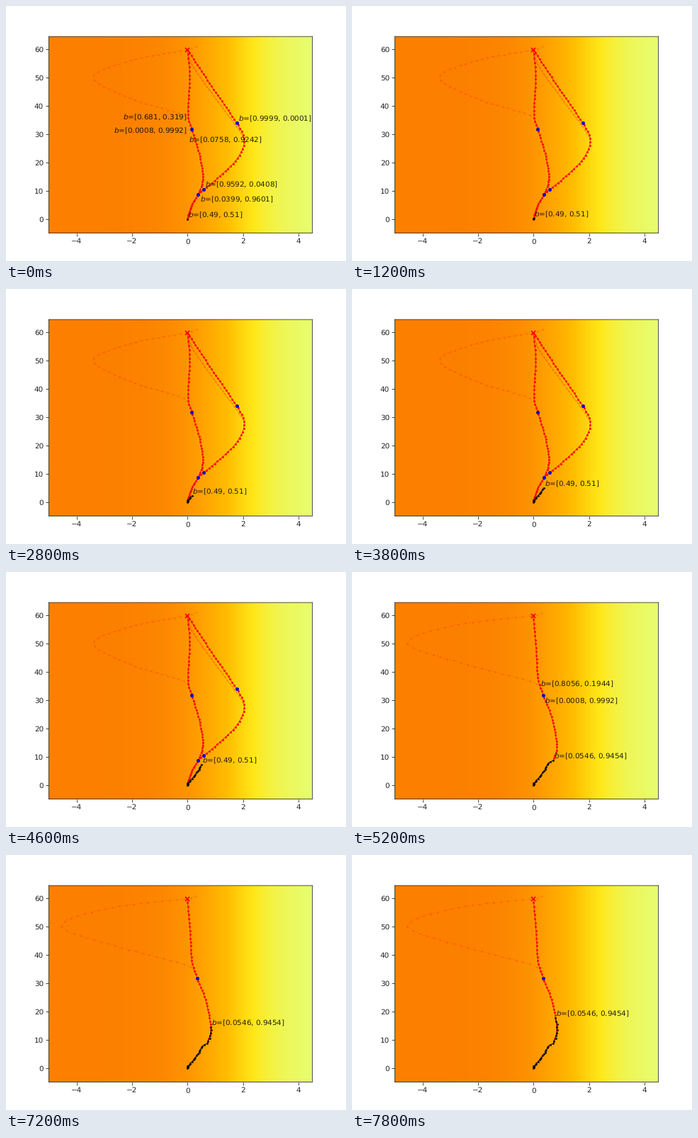
Write a matplotlib script that moves like this. It is 480 by 360 pixels and loops after 8000 ms.

```python
import numpy as np
import matplotlib.pyplot as plt
from matplotlib.animation import FuncAnimation

W, H, DPI = 480, 360, 75
X0, X1, Y0, Y1 = -5, 4.5, -5, 64.5

plt.rcParams.update({"text.hinting": "none", "axes.linewidth": 0.72,
                     "axes.edgecolor": "0.1", "xtick.color": "0.15",
                     "ytick.color": "0.15", "text.color": "#000000d8"})

fig = plt.figure(figsize=(W / DPI, H / DPI), dpi=DPI)
ax = fig.add_axes((60.4 / W, 39.4 / H, 372 / W, 277.5 / H))
ax.set_xlim(X0, X1)
ax.set_ylim(Y0, Y1)
for spine in ax.spines.values():
    spine.set_snap(False)


def to_data(points):
    """Stage pixels (y down) to axes units."""
    flipped = np.asarray(points, float) * (1, -1) + (0, H)
    return ax.transData.inverted().transform(flipped)


def smooth(points, gap_start, gap_end):
    """Catmull-Rom curve through points, resampled with a changing gap."""
    p = np.asarray(points, float)
    p = np.vstack([2 * p[0] - p[1], p, 2 * p[-1] - p[-2]])
    t = np.linspace(0, 1, 30, endpoint=False)[:, None]
    parts = []
    for a, b, c, d in zip(p, p[1:], p[2:], p[3:]):
        parts.append(0.5 * (2 * b + (c - a) * t + (2 * a - 5 * b + 4 * c - d) * t**2
                            + (3 * b - a - 3 * c + d) * t**3))
    curve = np.vstack(parts + [p[-2:-1]])
    s = np.r_[0, np.cumsum(np.hypot(*np.diff(curve, axis=0).T))]
    n = int(round(2 * s[-1] / (gap_start + gap_end)))
    steps = np.linspace(gap_start, gap_end, n)
    at = np.r_[0, np.cumsum(steps)] * s[-1] / steps.sum()
    return np.stack([np.interp(at, s, curve[:, i]) for i in (0, 1)], axis=-1)


def draw(points, line_alpha, dot_alpha, ms):
    x, y = to_data(points).T
    return [ax.plot(x, y, color="red", lw=0.9, alpha=line_alpha)[0],
            ax.plot(x, y, ".", color="red", ms=ms, mew=0, alpha=dot_alpha)[0]]


def likely(points, gap_start, gap_end):
    return draw(smooth(points, gap_start, gap_end), 0.75, 1, 5.6)


def unlikely(points, gap, line_alpha=0.09):
    return draw(smooth(points, gap, gap), line_alpha, 0.28, 4.2)


def branch_points(points):
    x, y = to_data(points).T
    return ax.plot(x, y, "o", color="blue", ms=4.4, mew=0.4, mec="navy", zorder=4)


def label(belief, x, y):
    """Text whose first glyph starts at x and whose digits are centred on y."""
    tx, ty = to_data((x - 0.5, y + 3.7))
    return ax.text(tx, ty, f"$b$=[{belief}]", fontsize=10, zorder=5)


# Sensor noise falls off as a logistic curve towards the light side
xs = np.linspace(X0, X1, 372)
field = 1 / (1 + np.exp(1.1 * (xs - 1.45)))
ax.imshow(field[None, :], cmap="Wistia", vmin=0, vmax=1, aspect="auto",
          extent=(X0, X1, Y0, Y1), zorder=0)

START, GOAL = (256, 300.5), (256, 61.5)
FORK, LATE_FORK, RIGHT_FORK = (271.3, 265.5), (262.3, 174), (325.6, 165.3)
NEW_FORK = (270, 174)

# First plan: two main branches and two unlikely detours
plan_a = (
    unlikely([LATE_FORK, (250, 154), (180, 132), (123, 100.5), (180, 76),
              GOAL, (269, 57)], 8)
    + unlikely([(334, 184), (326, 171), (294, 128), (263, 84), GOAL], 5.5, 0.22)
    + likely([START, (262, 281), FORK, (278, 243), (273, 210), LATE_FORK,
              (257, 152), (259.3, 100), GOAL], 2.6, 6.2)
    + likely([FORK, (301, 241), (326, 216), (336.5, 190), RIGHT_FORK,
              (290, 113), GOAL], 5, 5.2)
    + branch_points([FORK, (278.7, 258.7), LATE_FORK, RIGHT_FORK])
)

# Second plan, made on the way
plan_b = (
    unlikely([NEW_FORK, (256, 156), (154, 128.5), (77.5, 100), (145, 75),
              GOAL, (268, 58)], 10)
    + likely([(285, 263), (289.3, 245), (282, 206), NEW_FORK, (262.5, 150),
              (260, 110), GOAL], 4, 5.8)
    + branch_points([NEW_FORK])
)

notes_a = [label(*note) for note in (
    ("0.681, 0.319", 165.5, 156.3),
    ("0.0008, 0.9992", 152.5, 175),
    ("0.0758, 0.9242", 258.5, 188),
    ("0.9999, 0.0001", 328.5, 157.8),
    ("0.9592, 0.0408", 281.5, 251.3),
    ("0.0399, 0.9601", 274.5, 272),
)]
notes_b = [label("0.8056, 0.1944", 266.5, 156.5), label("0.0008, 0.9992", 272.5, 180.5)]

ax.plot(*to_data(GOAL), "x", color="red", ms=6, mew=1.6, zorder=4)

# Driven track: a few poses (step, x, y) with seeded wobble between them
poses = np.array([(0, *START), (6, 256.2, 298), (10, 262.5, 292), (15, 270.7, 281),
                  (20, 277, 270), (22, 284.4, 266), (25, 287.8, 255.3),
                  (28, 289.3, 243), (31, 287.4, 230)])
REPLAN, LAST = 22, 31    # step of the second plan, final step
steps = np.arange(LAST + 1)
rng = np.random.default_rng(4)
wobble = rng.uniform(-1, 1, (LAST + 1, 2)) * (1.2, 0.5)
wobble[poses[:, 0].astype(int)] = 0
track = to_data(wobble + np.stack(
    [np.interp(steps, poses[:, 0], poses[:, i]) for i in (1, 2)], axis=-1))

trail, = ax.plot([], [], ".-", color="black", lw=0.9, ms=5.2, mew=0, zorder=3)
here = label("0.49, 0.51", 257.5, 293.5)
OFFSET = to_data((0.9, -3.2)) - to_data((0, 0))
PAUSE = 4                # extra frames held at each plan


def show(artists, on):
    for artist in artists:
        artist.set_visible(on)


def update(frame):
    first = min(max(frame - PAUSE, 0), REPLAN)
    step = max(first, frame - 2 * PAUSE)
    replanned = step >= REPLAN
    show(plan_a, not replanned)
    show(plan_b, replanned)
    show(notes_a, step == 0)
    show(notes_b, step == REPLAN)
    trail.set_data(*track[:step + 1].T)
    here.set_position(track[step] + OFFSET)
    here.set_text("$b$=[0.0546, 0.9454]" if replanned else "$b$=[0.49, 0.51]")
    return [trail, here]


anim = FuncAnimation(fig, update, frames=40, interval=200, repeat=True,
                     repeat_delay=0, blit=False)
plt.show()
```
